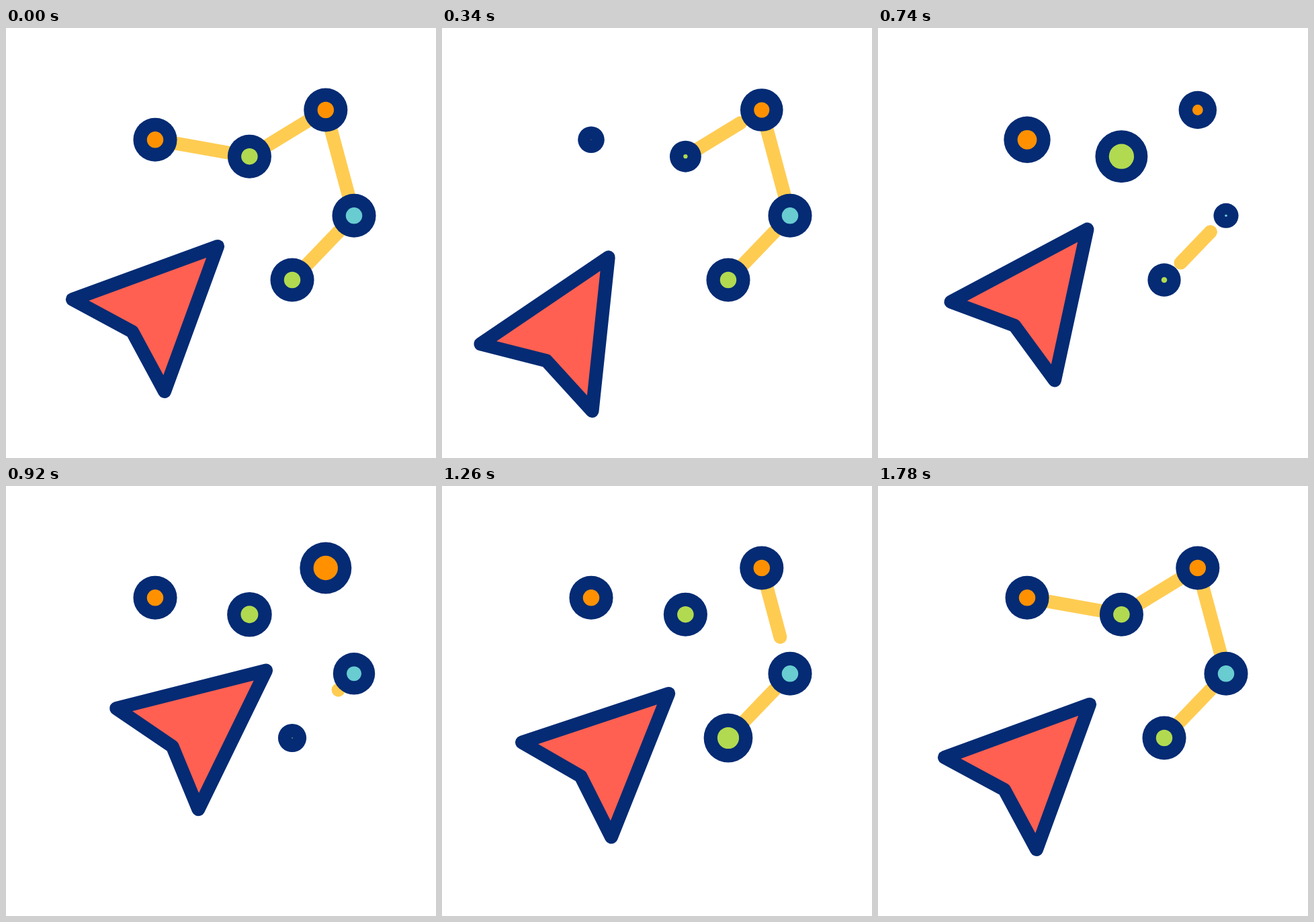
Animation of 640x640 px, one loop 2.4 s. Source, as an HTML page with a canvas:

```html
<!DOCTYPE html>
<html lang="en">
<head>
<meta charset="utf-8">
<title>Cursor and path</title>
<style>
  html, body { margin: 0; width: 100%; height: 100%; overflow: hidden; background: #fff; }
  canvas { display: block; width: 100vw; height: 100vh; }
</style>
</head>
<body>
<canvas id="stage"></canvas>
<script>
const LOOP = 2400, STEP = 20, SIZE = 640, WIDTH = 20;
const NAVY = '#042b74', RED = '#ff6051', YELLOW = '#ffcc52';
const ORANGE = '#ff9100', GREEN = '#b1da50', CYAN = '#68ccd1';

// gap: distance from the node centre to the start of the line leaving it
const nodes = [
  { x: 222, y: 166.3, fill: ORANGE, gap: 31 },
  { x: 362.4, y: 191.2, fill: GREEN, gap: 22 },
  { x: 475.8, y: 122, fill: ORANGE, gap: 23 },
  { x: 518, y: 279.3, fill: CYAN, gap: 33.6 },
  { x: 426, y: 375, fill: GREEN }
];
const END_GAP = 24;

// ring radius: every node plays the same pop, one lag after the other
const REST = 22.4, LOW = 7.3, HIGH = 28.8, HALF = 10.15, POP_LAG = 140;

// arrow corners around its pivot
const arrow = [[105, -105], [-111, -26], [-22, 22], [26, 111]];

const clamp = p => Math.min(1, Math.max(0, p));
const ramp = (t, start, length) => clamp((t - start) / length);
const mix = (a, b, p) => a + (b - a) * p;
const sine = p => (1 - Math.cos(Math.PI * p)) / 2;
const easeOut = p => 1 - (1 - p) ** 3;

const canvas = document.getElementById('stage');
const ctx = canvas.getContext('2d');

function fit() {
  const ratio = window.devicePixelRatio || 1;
  canvas.width = Math.round(innerWidth * ratio);
  canvas.height = Math.round(innerHeight * ratio);
}

function disc(x, y, r, fill) {
  ctx.fillStyle = fill;
  ctx.beginPath();
  ctx.arc(x, y, r, 0, Math.PI * 2);
  ctx.fill();
}

function popRadius(t) {
  if (t < 300) return mix(REST, LOW, ramp(t, 48, 252));
  if (t < 600) return mix(LOW, HIGH, ramp(t, 300, 300) ** 1.1);
  return mix(HIGH, REST, sine(ramp(t, 600, 230)));
}

function drawNode(node, i, t) {
  const r = popRadius(t - i * POP_LAG);
  disc(node.x, node.y, r + HALF, NAVY);
  disc(node.x, node.y, Math.abs(r - HALF), node.fill);
}

// lines shrink away first to last, then grow back last to first
function drawLine(i, t) {
  const hide = 130 + 200 * i, hideTime = 190, show = 1480 - 162 * i;
  const gone = t > hide + hideTime;
  if (gone && t < show) return;
  const part = gone ? easeOut(ramp(t, show, 300)) : 1 - easeOut(ramp(t, hide, hideTime));

  const a = nodes[i], b = nodes[i + 1];
  const dist = Math.hypot(b.x - a.x, b.y - a.y);
  const end = a.gap + part * (dist - a.gap - END_GAP);
  const at = d => [mix(a.x, b.x, d / dist), mix(a.y, b.y, d / dist)];
  disc(...at(a.gap), WIDTH / 2, YELLOW);
  ctx.strokeStyle = YELLOW;
  ctx.lineCap = 'round';
  ctx.beginPath();
  ctx.moveTo(...at(a.gap));
  ctx.lineTo(...at(end));
  ctx.stroke();
}

// pull back, shoot forward, fall short, settle
function swing(t, back, peak, dip, hold) {
  const go = 440 + hold, top = 1080 + hold / 5;
  if (t < go) return back * sine(ramp(t, 0, 440));
  if (t < top) return mix(back, peak, sine(ramp(t, go, top - go)));
  if (t < 1394) return mix(peak, dip, sine(ramp(t, top, 1394 - top)));
  return dip * (1 - sine(ramp(t, 1394, 272)));
}

function drawArrow(t) {
  const shift = swing(t, -44, 80, -19, 0);
  ctx.save();
  ctx.translate(210 + shift, 430 - shift);
  ctx.rotate(swing(t, -16, 12.6, -6.6, 100) * Math.PI / 180);
  ctx.beginPath();
  arrow.forEach(([x, y]) => ctx.lineTo(x, y));
  ctx.closePath();
  ctx.fillStyle = RED;
  ctx.fill();
  ctx.strokeStyle = NAVY;
  ctx.lineJoin = 'round';
  ctx.stroke();
  ctx.restore();
}

function draw(t) {
  ctx.setTransform(1, 0, 0, 1, 0, 0);
  ctx.fillStyle = '#fff';
  ctx.fillRect(0, 0, canvas.width, canvas.height);
  const k = Math.min(canvas.width, canvas.height) / SIZE;
  ctx.setTransform(k, 0, 0, k, (canvas.width - SIZE * k) / 2, (canvas.height - SIZE * k) / 2);
  ctx.lineWidth = WIDTH;
  for (let i = 0; i < nodes.length - 1; i++) drawLine(i, t);
  nodes.forEach((node, i) => drawNode(node, i, t));
  drawArrow(t);
}

const start = performance.now();
function tick() {
  const t = (performance.now() - start) % LOOP;
  draw(Math.floor(t / STEP) * STEP);
  requestAnimationFrame(tick);
}

addEventListener('resize', fit);
fit();
draw(0);
requestAnimationFrame(tick);
</script>
</body>
</html>
```
